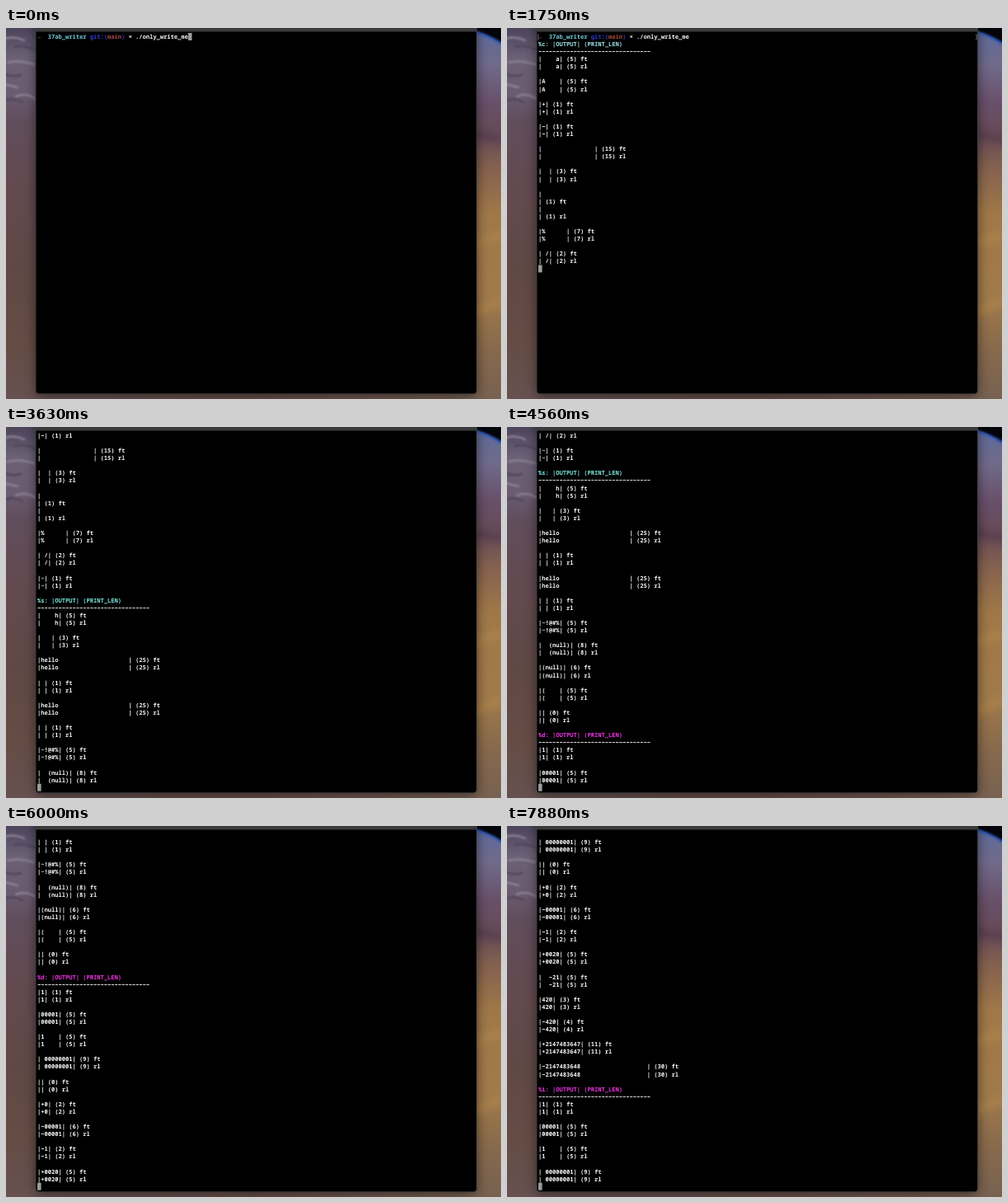
An HTML page that plays this animation: 600x450 px, repeating every 8 s.

```html
<!DOCTYPE html>
<html lang="en">
<head>
<meta charset="utf-8">
<title>Terminal output</title>
<style>
  html, body { margin: 0; width: 100%; height: 100%; overflow: hidden; background: #000; }
  svg { display: block; width: 600px; height: 450px; }
  text {
    font: 600 7.083px "Noto Sans Mono", "DejaVu Sans Mono", monospace;
    white-space: pre;
    text-rendering: geometricPrecision;
  }
  .bold { font-weight: 700; }
</style>
</head>
<body>
<svg viewBox="0 0 600 450" xmlns="http://www.w3.org/2000/svg">
  <defs>
    <linearGradient id="left" x2="0" y2="1">
      <stop offset="0" stop-color="#4d455c"/>
      <stop offset=".08" stop-color="#6b6075"/>
      <stop offset=".18" stop-color="#6a5b70"/>
      <stop offset=".25" stop-color="#604d5c"/>
      <stop offset=".42" stop-color="#634a50"/>
      <stop offset=".65" stop-color="#604845"/>
      <stop offset=".85" stop-color="#654c45"/>
      <stop offset="1" stop-color="#665150"/>
    </linearGradient>
    <linearGradient id="right" x2="0" y2="1">
      <stop offset="0" stop-color="#5c6a9a"/>
      <stop offset=".1" stop-color="#706a8a"/>
      <stop offset=".2" stop-color="#68506a"/>
      <stop offset=".29" stop-color="#664a56"/>
      <stop offset=".37" stop-color="#83604f"/>
      <stop offset=".5" stop-color="#a07848"/>
      <stop offset=".72" stop-color="#a07a4a"/>
      <stop offset=".87" stop-color="#87694c"/>
      <stop offset="1" stop-color="#776151"/>
    </linearGradient>
    <linearGradient id="base">
      <stop offset="0" stop-color="#665150"/>
      <stop offset=".5" stop-color="#644c49"/>
      <stop offset="1" stop-color="#776151"/>
    </linearGradient>
    <filter id="soft" x="-50%" y="-50%" width="200%" height="200%"><feGaussianBlur stdDeviation="1.2"/></filter>
    <filter id="haze" x="-50%" y="-50%" width="200%" height="200%"><feGaussianBlur stdDeviation="5"/></filter>
    <filter id="shade" x="-10%" y="-10%" width="120%" height="120%"><feGaussianBlur stdDeviation="7"/></filter>
  </defs>

  <rect width="600" height="450" fill="url(#base)"/>
  <rect width="60" height="450" fill="url(#left)"/>
  <rect x="560" width="40" height="450" fill="url(#right)"/>

  <g filter="url(#soft)" fill="none" stroke-linecap="round">
    <path d="M-2 13Q10 9 22 15M2 42Q15 38 34 44M-2 68L14 72M12 83Q24 78 36 86" stroke="#8b8092" stroke-width="2.5"/>
    <path d="M10 23Q22 20 36 27M-2 56Q8 60 18 57M-2 88Q10 84 20 90" stroke="#50475b" stroke-width="2.5"/>
  </g>
  <g filter="url(#haze)" fill="none">
    <path d="M565 128L605 136" stroke="#573e4e" stroke-width="8"/>
    <path d="M565 262L605 250M565 345L605 330" stroke="#aa824c" stroke-width="9"/>
  </g>
  <path d="M560 0V1Q584 8 600 19V0Z" fill="#04050b"/>
  <path d="M560 2Q584 8 602 20" fill="none" stroke="#2f57b8" stroke-width="3" filter="url(#soft)"/>

  <rect x="36" y="-20" width="535" height="466" rx="5" opacity=".5" filter="url(#shade)"/>
  <rect x="36" y="-10" width="534.5" height="453.8" rx="4" stroke="#454345" stroke-width=".8"/>
  <rect x="36" width="535" height="4.5" fill="#3b3b3c"/>
  <g id="screen"></g>
  <rect id="cursor" width="4.6" height="9" fill="#9c9c9c"/>
</svg>

<script>
  const LOOP = 8000, ROWS = 48, LEFT = 38, TOP = 6, COL = 4.25, ROW = 9.08;
  const WHITE = "#f6f6f6", MAGENTA = "#ef35e4";
  const pad = n => " ".repeat(n);

  const numbers = ["1", "00001", "1    ", " 00000001", "", "+0", "-00001", "-1", "+0020",
    "  -21", "420", "-420", "+2147483647", "-2147483648" + pad(19)];
  const sections = [
    ["c", "#9fe5e9", ["    a", "A    ", "+", "-", pad(15), "  \0", "\n", "%      ", " /", "~"]],
    ["s", "#7fe6dc", ["    h", "   ", "hello" + pad(20), " ", "hello" + pad(20), " ", "~!@#%",
      "  (null)", "(null)", "(    ", ""]],
    ["d", MAGENTA, numbers],
    ["i", MAGENTA, numbers.slice(0, 4)]
  ];

  // Each span is [text, colour, bold].
  const prompt = [
    ["→  ", "#b5815f", true], ["37ab_writer", "#70cbd8", true], [" git:(", "#3038d4", true],
    ["main", "#a94c3c", true], [")", "#3038d4", true], [" × ./only_write_me", WHITE]
  ];

  const lines = [[...prompt]];
  const ends = [0];
  const addLine = (text, color = WHITE, bold = false) => lines.push([[text, color, bold]]);

  sections.forEach(([type, color, outputs], s) => {
    outputs.forEach((output, i) => {
      if (s || i) addLine("");
      if (!i) {
        addLine(`%${type}: |OUTPUT| (PRINT_LEN)`, color, true);
        addLine("-".repeat(32));
      }
      for (const tag of ["ft", "rl"]) {
        const shown = `|${output.replace("\0", "")}| (${output.length}) ${tag}`;
        shown.split("\n").forEach(text => addLine(text));
      }
      ends.push(lines.length);
    });
  });

  const arrivals = ends.slice(1).map((_, k) => 10 * Math.round(6.25 * Math.ceil(0.8 + 3.25 * k)));

  const NS = "http://www.w3.org/2000/svg";
  const screen = document.getElementById("screen");
  const cursor = document.getElementById("cursor");

  function addText(x, row, text, color, bold) {
    const node = document.createElementNS(NS, "text");
    node.setAttribute("x", x);
    node.setAttribute("y", TOP + row * ROW + 7);
    node.setAttribute("fill", color);
    if (bold) node.setAttribute("class", "bold");
    // The terminal's hyphen is as wide as a minus sign.
    node.textContent = text.replaceAll("-", "\u2212");
    screen.append(node);
  }

  function addSpans(spans, row) {
    let col = 0;
    for (const [text, color, bold] of spans) {
      const indent = text.length - text.trimStart().length;
      if (text.trim()) addText(LEFT + (col + indent) * COL, row, text.slice(indent), color, bold);
      col += text.length;
    }
    return col;
  }

  function draw(count) {
    screen.replaceChildren();
    const end = count ? ends[count] : 1;
    const first = Math.max(0, end + 1 - ROWS);
    let width = 0;
    for (let i = first; i < end; i++) width = addSpans(lines[i], i - first);
    if (count && !first) {
      addText(35.8, 0, "[", "#777");
      addText(567, 0, "]", "#777");
    }
    cursor.setAttribute("x", LEFT + (count ? 0 : width * COL));
    cursor.setAttribute("y", TOP + (count ? end - first : 0) * ROW);
  }

  let drawn = -1;
  const start = performance.now();
  function update(now) {
    const time = Math.max(0, now - start) % LOOP;
    const count = arrivals.filter(at => at <= time).length;
    if (count !== drawn) draw(drawn = count);
    requestAnimationFrame(update);
  }
  update(start);
</script>
</body>
</html>
```
